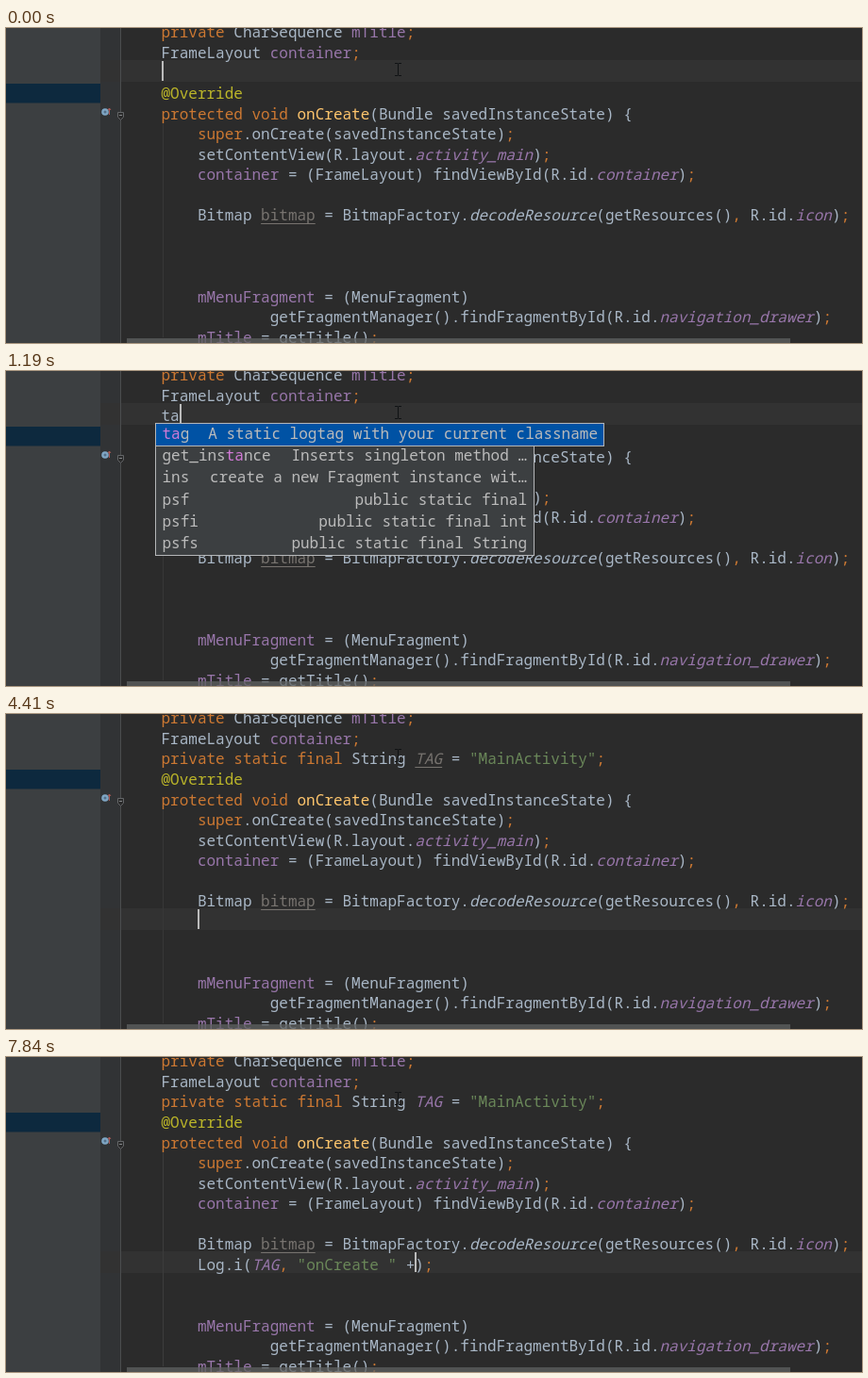
Recreate the animation shown at these times as an HTML page. Size 907x334 px, loop 8 s.

```html
<!DOCTYPE html>
<html lang="en">
<head>
<meta charset="utf-8">
<title>Live templates</title>
<style>
html, body { margin: 0; width: 100%; height: 100%; overflow: hidden; background: #2b2b2b; }
#stage { position: relative; width: 907px; height: 334px; overflow: hidden;
  background: linear-gradient(to right, #3c3f41 100px, #313335 0 122px, #2b2b2b 0);
  font: 500 16px "Noto Sans Mono", "DejaVu Sans Mono", monospace; color: #a9b7c6; }
#stage div, #stage svg { position: absolute; }
.line { left: 164.5px; height: 21.57px; line-height: 21.57px; white-space: pre; }
#band { left: 100px; width: 807px; height: 23px; background: #323232; }
#caret { width: 2px; height: 21px; background: #bbb; }
#guide { left: 166px; top: 100px; width: 1px; height: 228px; background: #373737; }
#hbar { left: 128px; top: 328.5px; width: 703px; height: 6px; background: rgba(94, 96, 96, .75); }
.k { color: #cc7832; }
.f { color: #9876aa; }
.s { color: #6a8759; }
.a { color: #bbb529; }
.m { color: #ffc66d; }
.i { font-style: italic; }
.c { color: #9876aa; font-style: italic; }
.u, .v { color: #77736f; text-decoration: underline 1px; text-underline-offset: 3px; }
.v { font-style: italic; }
.p { color: #ffef28; background: #3b514d; font-weight: bold; }
.e { text-decoration: underline 1px #bc3f3c; text-underline-offset: 3px; }
.h { background: #344134; }
.o { color: #bbb529; background: #364229; }
.popup { box-sizing: border-box; border: 1px solid #b4b6b8; background: #3c3f41; color: #bbb; }
.clip { inset: 0; overflow: hidden; }
.item { left: 0; height: 23.2px; line-height: 21px; white-space: pre; }
.item span { position: absolute; left: 6.5px; }
.item b { position: absolute; font-weight: inherit; }
.item em { font-style: normal; color: #d17ad6; }
.item.sel { background: #0052a4; }
.item.wide { border: 1px solid #b4b6b8; margin: -1px; }
.thumb { top: 1px; width: 8px; background: #6e7072; }
</style>
</head>
<body>
<div id="stage">
  <div id="band"></div>
  <div id="guide"></div>
  <div id="code"></div>
  <div id="caret"></div>
  <svg width="907" height="334" fill="none">
    <path d="M0 59h100v20.500H0z" fill="#0d293e"/>
    <path d="M121.500 0V334" stroke="#4b4d4e"/>
    <circle cx="105" cy="89" r="3.800" fill="#7fa6c4"/>
    <circle cx="105" cy="89" r="1.500" fill="#55708a"/>
    <path d="M109.500 92v-7m-1.500 2l1.500-2 1.500 2" stroke="#a85a56"/>
    <path d="M118.500 89.500h6v5l-3 3-3-3z" fill="#2b2b2b" stroke="#646668"/>
    <path d="M120 92.500h3" stroke="#85878a"/>
    <path d="M412 37.500h3l.5 1 .5-1h3M415.500 38v12M412 50.500h3l.5-1 .5 1h3" stroke="#101214"/>
    <g id="bulb">
      <circle cx="4.500" cy="4.500" r="4"/>
      <path d="M2.500 9.500h4M3 11.500h3" stroke="#a0a2a4"/>
    </g>
  </svg>
  <div id="hbar"></div>
  <div id="list"></div>
</div>
<script>
const LOOP = 8000, ROW = 21.57, CHAR = 9.6, LEFT = 164.5, TEXT_DROP = 2.8;
const $ = id => document.getElementById(id);
const rowTop = row => row * ROW - 8.5;

// [x|text] marks text with the style class x.
const style = text => text.replace(/\[(\w)\|([^\]]*)\]/g, '<span class="$1">$2</span>');

const END = '[k|;]';
const decl = tag => `[k|private static final] String ${tag} = [s|"MainActivity"]${END}`;
const log = (tag, gap, open, close) =>
  `    Log.i${open}${tag}[k|,] [s|"onCreate "] +${gap}${close}${END}`;
const bitmapLine = arg =>
  `    Bitmap [u|bitmap] = BitmapFactory.[i|decodeResource](${arg}()[k|,] R.id.[c|icon])${END}`;

const source = s => [
  `[k|private] CharSequence [f|mTitle]${END}`,
  `FrameLayout [f|container]${END}`,
  s.field,
  s.override,
  '[k|protected void] [m|onCreate](Bundle savedInstanceState) {',
  `    [k|super].onCreate(savedInstanceState)${END}`,
  `    setContentView(R.layout.[c|activity_main])${END}`,
  `    [f|container] = (FrameLayout) findViewById(R.id.[c|container])${END}`,
  '',
  bitmapLine(s.arg),
  s.entry,
  '',
  '',
  '    [f|mMenuFragment] = (MenuFragment)',
  `            getFragmentManager().findFragmentById(R.id.[c|navigation_drawer])${END}`,
  `    [f|mTitle] = getTitle()${END}`
];

const allTemplates = [
  ['blc', 'block comment for structuring code'], ['bmp'], ['ci'], ['cs'],
  ['fixme', 'adds //FIXME'],
  ['for_no_dec', 'Create iteration loop'],
  ['for_with_dec', 'Create iteration loop'],
  ['get_instance', 'Inserts singleton method…'],
  ['ins', 'create a new Fragment instance wi…'],
  ['key', 'Key for a bundle'], ['logd']
];
const tagTemplates = typed => [
  ['tag', 'A static logtag with your current classname'],
  ['get_instance', 'Inserts singleton method …'],
  ['ins', 'create a new Fragment instance wit…'],
  ['psf', 'public static final'],
  ['psfi', 'public static final int'],
  ['psfs', 'public static final String']
].map(([name, text]) => [name.replace(typed, '<em>$&</em>'), text]);
const bodyTemplates = [
  ['bmp'], ['C', 'Surround with Callable'], ['ci'], ['cs'], ['fd', 'findViewById with cast']
];
const logTemplates = typed => ['logi', 'logd', 'loge', 'logm', 'logw']
  .map(name => [name.replace(typed, '<em>$&</em>')]);

const topList = (x, y) => ({ x, y, w: 402, h: 246, right: 385, thumb: 96, items: allTemplates });
const tagList = typed =>
  ({ x: 158, y: 55, w: 402, h: 141, right: 394, wide: 474, items: tagTemplates(typed) });
const bodyList = { x: 195, y: 227, w: 402, h: 246, right: 384, thumb: 40, items: bodyTemplates };
const logList = typed =>
  ({ x: 196, y: 228, w: 402, h: 118, right: 384, items: logTemplates(typed) });

const plainTag = '[c|TAG]';
const steps = [
  [0, { row: 2, col: 0, caret: true, field: '', override: '[a|@Override]',
        arg: 'getResources', entry: '', list: null, bulb: null, guide: '#373737' }],
  [420, { list: topList(157, 54) }],
  [630, { caret: false }],
  [910, { caret: true, col: 1, field: 't', list: topList(158, 55) }],
  [1050, { list: tagList('t') }],
  [1190, { col: 2, field: 'ta', list: tagList('ta') }],
  [1400, { col: 49, field: decl('TAG'), list: null }],
  [1680, { field: decl(plainTag) }],
  [1820, { field: decl('[v|TAG]') }],
  [2100, { bulb: [133, 37, '#d9b54a'] }],
  [2380, { row: 3, col: 9, bulb: null, override: '[a|@][o|Override]' }],
  [2660, { row: 4, col: 49 }],
  [2800, { row: 5, col: 39 }],
  [2940, { row: 7, col: 49 }],
  [3010, { row: 8, col: 0 }],
  [3150, { row: 9, col: 49 }],
  [3430, { override: '[a|@Override]', arg: '[h|getResources]' }],
  [3640, { row: 10, col: 0 }],
  [3920, { arg: 'getResources' }],
  [4410, { col: 4 }],
  [4550, { guide: '#3c3c3c' }],
  [4970, { list: bodyList }],
  [5250, { col: 5, entry: '    l', list: logList('l') }],
  [5740, { col: 6, entry: '    lo', list: logList('lo') }],
  [5880, { col: 8, entry: '    logi', list: { ...logList('logi'), h: 25 } }],
  [6020, { col: 29, entry: log('TAG', ' ', '[p|(]', '[p|)]'), list: null }],
  [6300, { field: decl(plainTag), entry: log(plainTag, ' ', '[p|(]', '[p|)]') }],
  [6440, { entry: log(plainTag, ' ', '(', '[e|)]') }],
  [6510, { bulb: [113, 176, '#c75450'] }],
  [7210, { caret: false }],
  [7630, { caret: true, col: 28, bulb: null, entry: log(plainTag, '', '[p|(]', '[p|)]') }],
  [7840, { entry: log(plainTag, '', '(', ')') }]
];

function popup({ x, y, w, h, right, thumb, wide, items }) {
  const item = ([name, text = ''], i) => {
    const width = i || !wide ? w - 2 : wide;
    const edge = i || !wide ? right : 469;
    const kind = i ? '' : wide ? ' sel wide' : ' sel';
    return `<div class="item${kind}" style="top:${i * 23.2}px;width:${width}px">` +
      `<span>${name}</span><b style="right:${width - edge + 1}px">${text}</b></div>`;
  };
  const rows = items.map(item);
  const bar = thumb ? `<div class="thumb" style="left:${w - 11}px;height:${thumb}px"></div>` : '';
  return `<div class="popup" style="left:${x}px;top:${y}px;width:${w}px;height:${h}px">` +
    `<div class="clip">${rows.slice(1).join('')}</div>${rows[0]}${bar}</div>`;
}

function draw(s) {
  $('band').style.top = Math.round(rowTop(s.row) - 1) + 'px';
  $('guide').style.background = s.guide;
  $('code').innerHTML = source(s).map((text, row) =>
    `<div class="line" style="top:${rowTop(row) + TEXT_DROP}px">${style(text)}</div>`).join('');
  $('caret').style.cssText = `left:${Math.round(LEFT + s.col * CHAR)}px;` +
    `top:${Math.round(rowTop(s.row))}px;visibility:${s.caret ? 'visible' : 'hidden'}`;
  $('bulb').style.display = s.bulb ? '' : 'none';
  if (s.bulb) {
    const [x, y, color] = s.bulb;
    $('bulb').setAttribute('transform', `translate(${x} ${y})`);
    $('bulb').setAttribute('fill', color);
  }
  $('list').innerHTML = s.list ? popup(s.list) : '';
}

const start = performance.now();
let shown = 0;
function tick() {
  const time = (performance.now() - start) % LOOP;
  const past = steps.filter(([at]) => at <= time);
  if (past.length !== shown) {
    shown = past.length;
    draw(Object.assign({}, ...past.map(([, change]) => change)));
  }
  requestAnimationFrame(tick);
}
tick();
</script>
</body>
</html>
```
